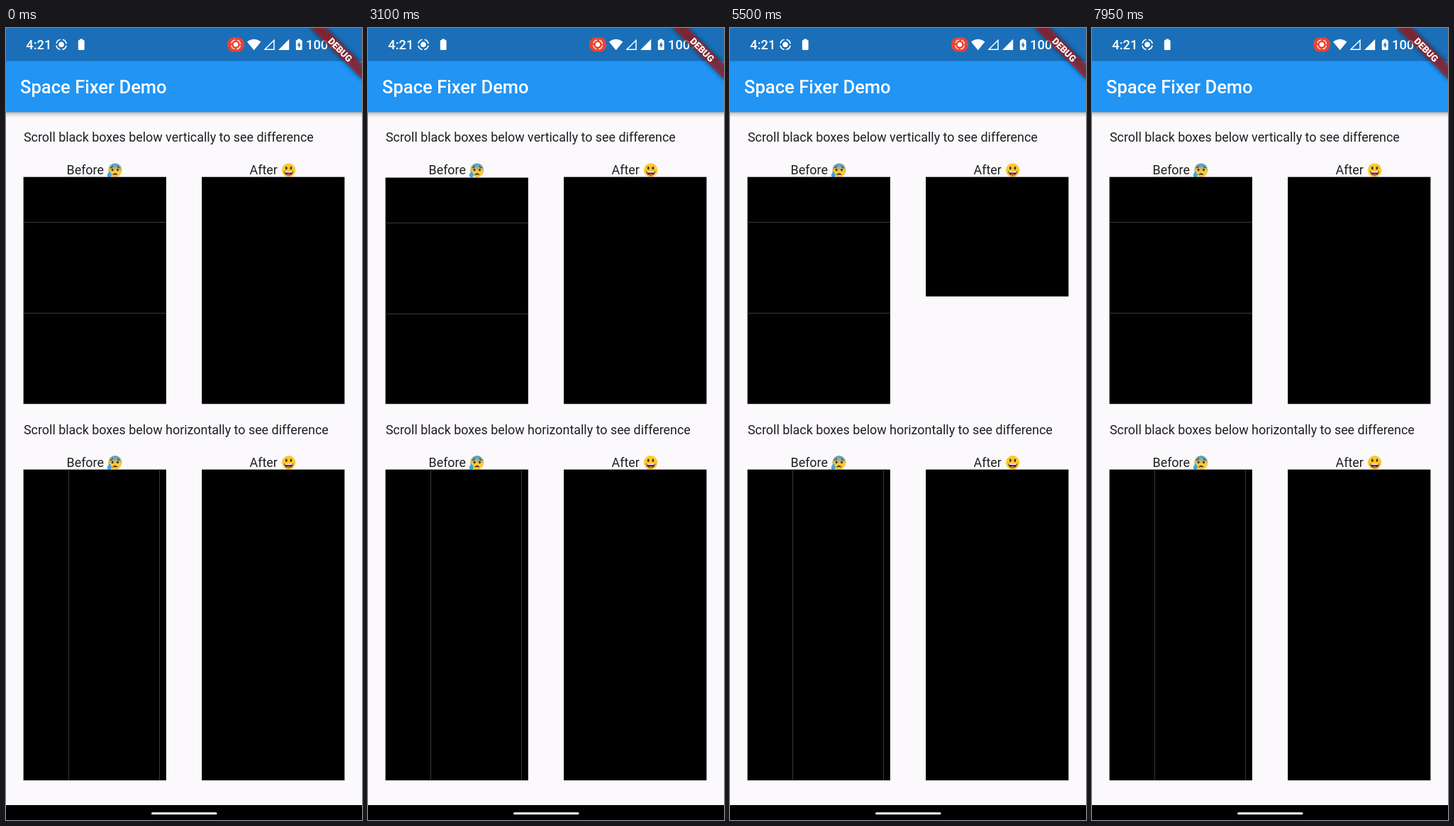
An HTML page for the animation above (8000 ms loop, 502 px wide and 1115 px high).

```html
<!DOCTYPE html>
<html lang="en">
<head>
<meta charset="utf-8">
<title>Space Fixer Demo</title>
<style>
  html, body { margin: 0; width: 100%; height: 100%; overflow: hidden; background: #fbf9fc; }
  svg { display: block; width: 502px; height: 1115px; font: 17.9px Roboto, sans-serif; }
  .body { fill: #1f1e20; }
  .status { fill: #fff; font-weight: 500; font-size: 18.3px; }
  .title { fill: #fff; font-weight: 500; font-size: 25.57px; }
  .banner { fill: #fff; font-weight: 900; font-size: 13px; text-anchor: middle; }
  .seam { fill: #3a3a3a; }
  .line { fill: none; stroke: #fff; }
</style>
</head>
<body>
<svg viewBox="0 0 502 1115">
  <defs>
    <linearGradient id="shade" x2="0" y2="1">
      <stop stop-color="#000" stop-opacity=".34"/>
      <stop offset=".4" stop-color="#000" stop-opacity=".13"/>
      <stop offset="1" stop-color="#000" stop-opacity="0"/>
    </linearGradient>
    <linearGradient id="worry" x2="0" y2="1">
      <stop offset=".1" stop-color="#5e9fc4"/>
      <stop offset=".58" stop-color="#fcc83a"/>
    </linearGradient>
    <filter id="blur" x="-20%" y="-60%" width="140%" height="220%"><feGaussianBlur stdDeviation="3"/></filter>
    <g id="anxious">
      <circle r="9.7" fill="url(#worry)"/>
      <path d="M-6.8-3.2Q-4-3.8-3-6M6.8-3.2Q4-3.8 3-6" fill="none" stroke="#4a3a2c" stroke-width="1.1"/>
      <ellipse cx="-3.7" cy="-.4" rx="1.4" ry="1.8" fill="#3e3028"/>
      <ellipse cx="3.7" cy="-.4" rx="1.4" ry="1.8" fill="#3e3028"/>
      <path d="M-4 6.8Q0 1.2 4 6.8Q0 5.8-4 6.8Z" fill="#4a3028"/>
      <path d="M-8 .8C-6.5 3.6-5 5-5 7A3 3 0 0 1-11 7C-11 5-9 3.4-8 .8Z" fill="#3fa7e4"/>
    </g>
    <g id="happy">
      <circle r="9.7" fill="#fcc82e"/>
      <ellipse cx="-3.3" cy="-3" rx="1.4" ry="2.3" fill="#4a3327"/>
      <ellipse cx="3.3" cy="-3" rx="1.4" ry="2.3" fill="#4a3327"/>
      <path d="M-6.4 1.4H6.4C5.8 5.6 3.2 7.6 0 7.6S-5.8 5.6-6.4 1.4Z" fill="#4a2b25"/>
      <path d="M-5.4 1.4H5.4L4.8 3.2H-4.8Z" fill="#fff"/>
      <ellipse cy="6.1" rx="2.8" ry="1.3" fill="#e8514a"/>
    </g>
    <g id="labels" class="body">
      <text x="85.5" y="206.2">Before</text>
      <text x="343.5" y="206.2">After</text>
      <use href="#anxious" x="153.8" y="200.2"/>
      <use href="#happy" x="398.6" y="200.2"/>
    </g>
  </defs>

  <rect width="502" height="1115" fill="#fbf9fc"/>
  <rect y="118" width="502" height="8" fill="url(#shade)"/>
  <rect width="502" height="118.3" fill="#2194f4"/>
  <rect width="502" height="46.5" fill="#1a6fb8"/>
  <text class="title" x="20" y="92.2">Space Fixer Demo</text>

  <g fill="#fff">
    <text class="status" x="28.3" y="29.6">4:21</text>
    <circle class="line" cx="78" cy="23.3" r="7.2" stroke-width="1.7" stroke-dasharray="8.3 3" stroke-dashoffset="-1.5"/>
    <circle cx="78" cy="23.3" r="3.8"/>
    <path d="M104 17v-1.6h4.4V17h1q1.2 0 1.2 1.2v11.6q0 1.2-1.2 1.2h-6.4q-1.2 0-1.2-1.2V18.200q0-1.200 1.200-1.200Z"/>
    <rect x="312" y="13" width="24" height="20.500" rx="9.500" fill="#ea4335"/>
    <circle class="line" cx="324" cy="23.300" r="6.500" stroke-width="1.300" stroke-dasharray="7.200 3" stroke-dashoffset="-1.500"/>
    <circle cx="324" cy="23.300" r="3.200"/>
    <path d="M340 19.500Q349.700 12 359.400 19.500L349.700 31.300Z"/>
    <path class="line" d="M365 30V30.200H378V17.300Z" stroke-width="1.500"/>
    <path d="M384 31H399.200V15.700Z"/>
    <path d="M411 17v-1.600h4.400V17h1q1.200 0 1.200 1.200v11.600q0 1.200-1.200 1.200h-6.400q-1.200 0-1.200-1.200V18.200q0-1.200 1.200-1.200Z"/>
    <path d="M413.900 19.300L410.700 24.800H412.700V28.800L415.800 23.200H413.900Z" fill="#1a6fb8"/>
    <text class="status" x="423" y="29.600">100%</text>
  </g>

  <g transform="translate(502) rotate(45)">
    <rect x="-52" y="35.800" width="104" height="15.300" opacity=".5" filter="url(#blur)"/>
    <rect x="-52" y="35.800" width="104" height="15.300" fill="#b71c1c" fill-opacity=".63"/>
    <text class="banner" y="48.100">DEBUG</text>
  </g>

  <text class="body" x="25" y="160.200">Scroll black boxes below vertically to see difference</text>
  <use href="#labels"/>
  <text class="body" x="25" y="571.800">Scroll black boxes below horizontally to see difference</text>
  <use href="#labels" y="411.600"/>

  <rect id="before" x="24.600" width="201.300"/>
  <g id="seams"></g>
  <rect id="after" x="276.100" width="201.300"/>

  <rect x="24.600" y="621.600" width="201.300" height="437.600"/>
  <rect x="276.100" y="621.600" width="201.300" height="437.600"/>
  <rect class="seam" x="88" y="621.600" width="1" height="437.600"/>
  <rect class="seam" x="216" y="621.600" width="1" height="437.600"/>

  <rect y="1094" width="502" height="21"/>
  <rect x="205" y="1104.300" width="92.500" height="3" rx="1.500" fill="#fff"/>
</svg>
<script>
const LOOP = 8000, STEP = 50;
const PIXEL = 502 / 1080;            // one device pixel on the stage
const ITEM = 137.5 * PIXEL, COUNT = 5;
const TOP = 209.7, BOTTOM = TOP + ITEM * COUNT;

// Each pull stretches the list from `from` to `peak`, then springs back.
const pulls = {
  before: [
    { start: 1450, release: 2482, from: 116, peak: 150 },
    { start: 6824, release: 7200, from: 0, peak: -150 },
  ],
  after: [
    { start: 3480, release: 4265, from: 0, peak: 150 },
    { start: 5080, release: 5580, from: 0, peak: -162.5 },
  ],
};

const ease = u => u * u * (3 - 2 * u);

// Overdamped spring: mass 0.5, stiffness 100, damping ratio 1.1
const SLOW = 9.08, FAST = 22.03;
const spring = s => (FAST * Math.exp(-SLOW * s) - SLOW * Math.exp(-FAST * s)) / (FAST - SLOW);

function offsetAt(list, t) {
  const pull = list.filter(p => t >= p.start).pop();
  if (!pull) return 0;
  const { start, release, from, peak } = pull;
  const y = t < release
    ? from + (peak - from) * ease((t - start) / (release - start))
    : peak * spring((t - release) / 1000);
  return Math.abs(y) < 0.4 ? 0 : y;
}

const byId = id => document.getElementById(id);
const boxes = { before: byId('before'), after: byId('after') };
const seams = Array.from({ length: COUNT - 1 }, () => {
  const seam = document.createElementNS('http://www.w3.org/2000/svg', 'rect');
  seam.setAttribute('class', 'seam');
  seam.setAttribute('x', 24.6);
  seam.setAttribute('width', 201.3);
  seam.setAttribute('height', 1);
  return byId('seams').appendChild(seam);
});

function place(box, offset) {
  const top = Math.max(TOP, TOP + offset);
  box.setAttribute('y', top);
  box.setAttribute('height', Math.min(BOTTOM, BOTTOM + offset) - top);
}

function draw(now) {
  const t = Math.floor((now % LOOP) / STEP) * STEP;
  const halves = Math.round(offsetAt(pulls.before, t) / PIXEL * 2);
  const offset = halves * PIXEL / 2;
  place(boxes.before, offset);
  place(boxes.after, offsetAt(pulls.after, t));

  // A seam shows only where an item edge falls on half a device pixel.
  seams.forEach((seam, i) => {
    const y = Math.floor(TOP + offset + (i + 1) * ITEM);
    const split = (halves + i + 1) % 2 !== 0;
    seam.setAttribute('y', y);
    seam.setAttribute('visibility', split && y > TOP && y < BOTTOM - 1 ? 'visible' : 'hidden');
  });
}

const origin = performance.now();
function tick() {
  draw(performance.now() - origin);
  requestAnimationFrame(tick);
}
tick();
</script>
</body>
</html>
```
